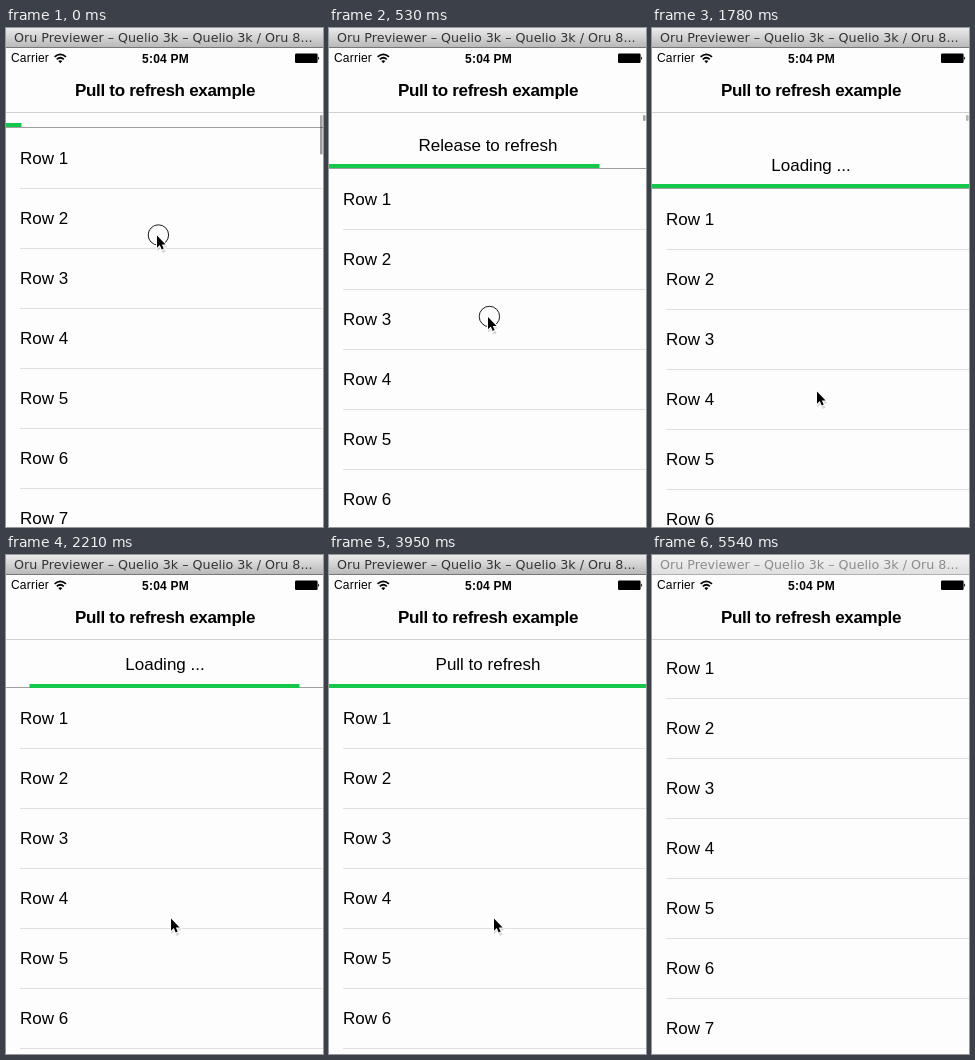
These frames come from a looping animation (317 px wide and 499 px high, 5.6 s). An HTML page:

```html
<!DOCTYPE html>
<html lang="en">
<head>
<meta charset="utf-8">
<title>Pull to refresh example</title>
<style>
  html, body { margin: 0; width: 100%; height: 100%; overflow: hidden; background: #fdfdfd; }
  svg { display: block; width: 100vw; height: 100vh; }
  text { font: 17px "Liberation Sans", Arial, sans-serif; fill: #000; }
  .mid { text-anchor: middle; }
  .nav { font-weight: bold; letter-spacing: -.3px; }
  .small { font-size: 12px; letter-spacing: .2px; }
  .bold { font-weight: bold; }
  .window { font: 12.7px "DejaVu Sans", "Open Sans", sans-serif; }
</style>
</head>
<body>
<svg viewBox="0 0 317 499" preserveAspectRatio="none">
  <defs>
    <linearGradient id="active" x2="0" y2="1">
      <stop stop-color="#ebebeb"/><stop offset="1" stop-color="#b6b6b6"/>
    </linearGradient>
    <linearGradient id="idle" x2="0" y2="1">
      <stop stop-color="#f3f3f3"/><stop offset="1" stop-color="#dedede"/>
    </linearGradient>
  </defs>
  <rect width="317" height="499" fill="#fdfdfd"/>

  <g id="table">
    <text id="label" class="mid" x="159" y="64.6"></text>
    <rect y="82" width="317" height="1" fill="#a0a0a0"/>
    <rect id="bar" height="4" fill="#14c84c"/>
    <g id="rows"></g>
  </g>
  <rect id="thumb" x="314" y="87" width="2.6" rx="1.2" fill="#000"/>

  <rect y="20" width="317" height="64" fill="#fdfdfd"/>
  <rect y="84" width="317" height="1" fill="#d0d0d0"/>
  <text class="small" x="5" y="34.2">Carrier</text>
  <g fill="none" stroke="#000" stroke-width="1.7">
    <path d="M48.6 28.9Q54.3 23.8 60 28.9"/>
    <path d="M50.8 31.3Q54.3 28.2 57.8 31.3"/>
  </g>
  <path d="M52.3 33Q54.3 31.3 56.3 33L54.3 35.2Z"/>
  <text class="small bold mid" x="159.5" y="34.6">5:04 PM</text>
  <rect x="289" y="25.6" width="22.6" height="9.4" rx="1.2"/>
  <path d="M312.2 28.6Q314.2 30.3 312.2 32Z"/>
  <text class="nav mid" x="159" y="68">Pull to refresh example</text>

  <rect id="frame" width="317" height="20"/>
  <rect id="edge" y="19" width="317" height="1"/>
  <text id="caption" class="window" x="8" y="14">Oru Previewer – Quelio 3k – Quelio 3k / Oru 8...</text>

  <g id="pointer">
    <circle id="touch" cx="2.4" cy="1" r="10.2" fill="none" stroke="#000" stroke-width=".9"/>
    <path d="M1 3V17L4.3 14.5L6.8 19L9.6 17.8L7.4 13.4L11.4 13Z" opacity=".15"/>
    <path d="M1 1.5V13.7L3.8 11.1L5.7 15.5L7.7 14.6L5.8 10.4H9.6Z" stroke="#fff" stroke-width="2" paint-order="stroke"/>
  </g>
</svg>
<script>
const LOOP = 5600, TICK = 87.75;
const RELEASE = 19, PULSE = 23.9, HALF = 4.53, DONE = 42, RETRACT = 44.9;
const $ = id => document.getElementById(id);
const set = (id, attrs) => {
  for (const name in attrs) $(id).setAttribute(name, attrs[name]);
};
const clamp = x => Math.min(1, Math.max(0, x));
const ease = x => { x = clamp(x); return x * x * (3 - 2 * x); };

// Points are [tick, value]
function track(points, k) {
  let a = points[0];
  for (const b of points) {
    if (k <= b[0]) return b === a ? a[1] : a[1] + (b[1] - a[1]) * (k - a[0]) / (b[0] - a[0]);
    a = b;
  }
  return a[1];
}

const pull = [[0, 16.5], [3, 40], [6, 57.5], [7, 60], [9, 69], [11, 78], [13, 83]];
const filled = [[0, 15.5], [3, 150], [6, 270.5], [7, 317]];
const pointerX = [[0, 150], [6, 158], [11, 163], [13, 164], [53, 164], [54, 183], [58, 282], [59, 312]];
const pointerY = [[0, 206], [3, 251], [6, 287.5], [7, 291], [11, 345.5], [13, 362], [53, 362], [54, 393], [58, 488], [59, 515]];

$("rows").innerHTML = Array.from({ length: 8 }, (_, i) =>
  `<text x="14" y="${119.4 + 60 * i}">Row ${i + 1}</text>` +
  `<rect x="14" y="${143 + 60 * i}" width="303" height="1" fill="#e0e0e0"/>`).join("");

function offset(k) {
  if (k < RELEASE) return track(pull, k);
  if (k < RETRACT) return 83 - 33 * ease((k - RELEASE + .3) / 4.9);
  return 50 * (1 - ease((k - RETRACT) / 3.4));
}

function barWidth(k) {
  if (k < PULSE || k >= DONE) return track(filled, k);
  const phase = (k - PULSE) / HALF % 2;
  return 317 * (1 - ease(1 - Math.abs(1 - phase)));
}

function caption(k, off) {
  if (k >= RELEASE && k < DONE) return "Loading ...";
  return k < RELEASE && off >= 50 ? "Release to refresh" : "Pull to refresh";
}

function draw(t) {
  const k = Math.floor(t % LOOP / TICK);
  // The display is double density, so positions fall on half pixels
  const off = Math.round(offset(k) * 2) / 2, top = Math.ceil(off);
  const width = barWidth(k), idle = k >= 63;

  set("table", { transform: `translate(0 ${top})` });
  set("bar", { x: k < PULSE ? 0 : (317 - width) / 2, y: 79 + Math.floor(off) - top, width });
  $("label").textContent = caption(k, off);
  set("thumb", {
    height: Math.max(6, 56 - off),
    opacity: .38 * (1 - clamp((k - RELEASE) / 4))
  });
  set("pointer", {
    transform: `translate(${track(pointerX, k)} ${track(pointerY, k)})`,
    visibility: k < 59 ? "visible" : "hidden"
  });
  set("touch", { opacity: k < RELEASE ? 1 : 0 });
  set("frame", { fill: idle ? "url(#idle)" : "url(#active)" });
  set("edge", { fill: idle ? "#b0b0b0" : "#777" });
  $("caption").style.fill = idle ? "#8c8c8c" : "#333";
}

const start = performance.now();
function loop() {
  draw(performance.now() - start);
  requestAnimationFrame(loop);
}
loop();
</script>
</body>
</html>
```
